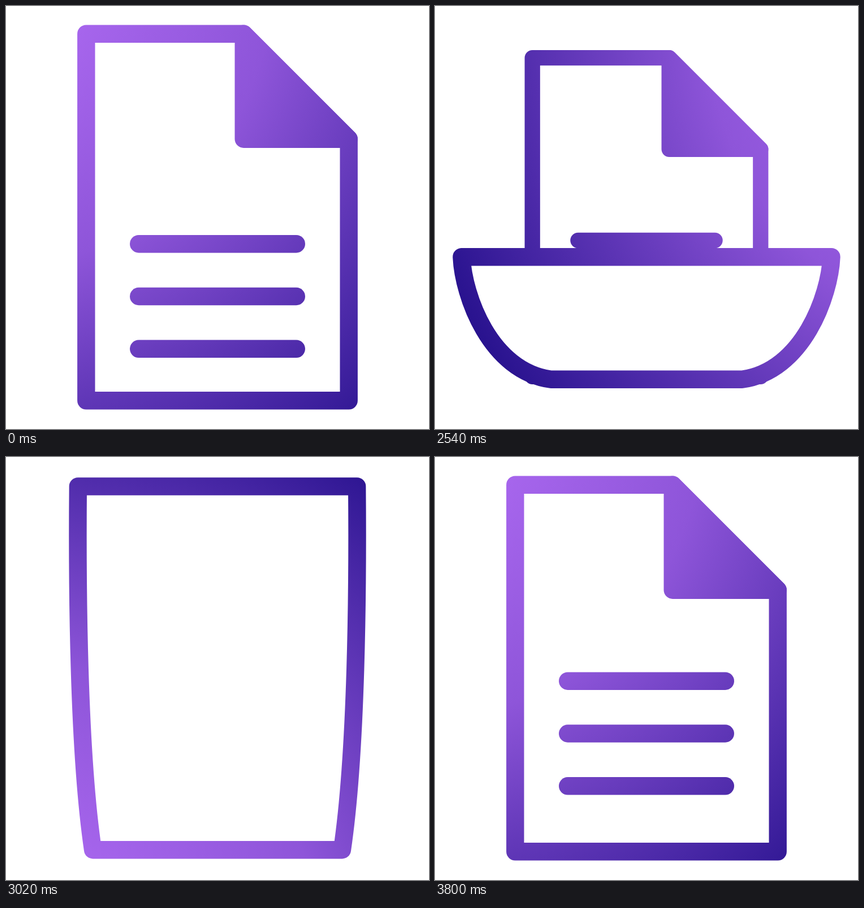
An HTML page with a canvas that plays this animation: 748 px wide and 748 px high, repeating every 3.83 s.

```html
<!DOCTYPE html>
<html lang="en">
<head>
<meta charset="utf-8">
<title>Page swap</title>
<style>
  html, body { margin: 0; width: 100%; height: 100%; overflow: hidden; background: #fff; }
  canvas { display: block; width: 100vw; height: 100vh; }
</style>
</head>
<body>
<canvas id="stage" width="748" height="748"></canvas>
<script>
const ctx = document.getElementById('stage').getContext('2d');
const LOOP = 3830, HOLD = 2030, STEP = 30;
const MID_X = 374, MID_Y = 373.4, STROKE = 31.4, FOLD = 186;
const LIFT = 24.4;

const clamp = x => Math.min(1, Math.max(0, x));
const part = (n, from, to) => clamp((n - from) / (to - from));
const smooth = x => x * x * (3 - 2 * x);
const easeOut = power => x => 1 - (1 - x) ** power;
const hump = x => Math.sin(Math.PI * x);
const linear = x => x;

// The sheet opens from a line into a bowl, a cup and a page.
// half and base are its half widths above and below; [out, along] are the side handles.
const line = { at: 9, top: 704.5, bottom: 704.5, half: 270, base: 165, upper: [0, 0], lower: [0, 0] };
const bowl = { at: 17, top: 443.7, bottom: 660.3, half: 327, base: 169, upper: [-3, 68], lower: [108, 15], ease: linear };
const cup = { at: 26, top: 133.5, bottom: 681.4, half: 290, base: 185, upper: [6, 157], lower: [103, 141], ease: linear };
const page = { at: 40, top: 49.2 - LIFT, bottom: 697.8 - LIFT, half: 232.2, base: 232.2, upper: [0, FOLD], lower: [0, FOLD], ease: easeOut(2) };
const poses = [line, bowl, cup, page];

const fullPage = {
  ...page, top: page.top + LIFT, bottom: page.bottom + LIFT,
  fold: 2, lineTop: 371.5, lines: [1, 1, 1]
};

function mix(a, b, x) {
  return Array.isArray(a) ? a.map((v, i) => mix(v, b[i], x)) : a + (b - a) * x;
}

function newSheet(n) {
  const i = Math.max(1, poses.findIndex(pose => n < pose.at));
  const next = n < page.at ? poses[i] : page;
  const last = n < page.at ? poses[i - 1] : cup;
  const x = next.ease(part(n, last.at, next.at));
  const sheet = {
    fold: 2 * smooth(part(n, 37, 57)),
    lineTop: 347,
    lines: [35, 38, 41].map(begin => easeOut(3)(part(n, begin, begin + 10)))
  };
  for (const key of ['top', 'bottom', 'half', 'base', 'upper', 'lower'])
    sheet[key] = mix(last[key], next[key], x);

  // the line grows, the cup stretches downwards, the page settles
  const grow = part(n, 0, line.at);
  const drop = 7.5 * (1 - grow) + LIFT * smooth(part(n, 43, 57));
  sheet.half *= grow;
  sheet.base *= grow;
  sheet.top += drop;
  sheet.bottom += drop + 20 * hump(part(n, cup.at, 38));
  return sheet;
}

// The light circles the stage once, swinging wider on its way
function lightPaint(n, scale) {
  const angle = 2 * Math.PI * (smooth(part(n, 0, 54) ** 0.88) - 0.375);
  const radius = (614 + 130 * hump(part(n, 5, 37)) ** 2) / scale;
  const x = radius * Math.cos(angle), y = radius * Math.sin(angle);
  const paint = ctx.createRadialGradient(x, MID_Y + y, 0, x, MID_Y + y, 1090 / scale);
  paint.addColorStop(0.2, '#a665ec');
  paint.addColorStop(0.49, '#8e55d9');
  paint.addColorStop(1, '#28128e');
  return paint;
}

// x is measured from the middle of the stage, y from its top
function drawPage(p, n, scale) {
  ctx.setTransform(scale, 0, 0, scale, MID_X, MID_Y * (1 - scale));
  const paint = ctx.strokeStyle = lightPaint(n, scale);
  ctx.lineWidth = STROKE;
  ctx.lineJoin = ctx.lineCap = 'round';

  const { top, bottom, half, base } = p;
  const [upOut, upDown] = p.upper, [lowOut, lowUp] = p.lower;
  const cut = clamp(p.fold), flap = clamp(p.fold - 1);
  const reach = clamp(cut * 3), start = FOLD * reach;
  const dip = FOLD / 2 * cut, pull = 58 * cut, bend = 105 * (1 - cut) * reach;

  ctx.beginPath();
  ctx.moveTo(-half, top);
  ctx.lineTo(half - start, top);
  ctx.bezierCurveTo(half - start + bend, top, half - dip - pull, top + dip - pull, half - dip, top + dip);
  ctx.bezierCurveTo(half - dip + pull, top + dip + pull, half, top + start - bend, half, top + start);
  ctx.bezierCurveTo(half + upOut, top + Math.max(upDown, start), base + lowOut, bottom - lowUp, base, bottom);
  ctx.lineTo(-base, bottom);
  ctx.bezierCurveTo(-base - lowOut, bottom - lowUp, -half - upOut, top + upDown, -half, top);
  ctx.closePath();
  ctx.fillStyle = '#fff';
  ctx.fill();
  ctx.stroke();

  if (flap > 0) {
    const tip = FOLD / 2 * (1 + flap);
    ctx.beginPath();
    ctx.moveTo(half - FOLD, top);
    ctx.lineTo(half, top + FOLD);
    ctx.lineTo(half - tip, top + tip);
    ctx.closePath();
    ctx.fillStyle = paint;
    ctx.fill();
    ctx.stroke();
  }

  p.lines.forEach((length, i) => {
    if (length <= 0) return;
    const y = top + p.lineTop + 92.8 * i;
    ctx.beginPath();
    ctx.moveTo(-139.3, y);
    ctx.lineTo(-139.3 + 278.6 * length, y);
    ctx.stroke();
  });
}

function draw(now) {
  const n = Math.max(0, Math.floor((now % LOOP - HOLD) / STEP));
  ctx.setTransform(1, 0, 0, 1, 0, 0);
  ctx.fillStyle = '#fff';
  ctx.fillRect(0, 0, 748, 748);
  if (n <= cup.at) drawPage(fullPage, n, 1 - 1.936e-4 * n ** 2.3);
  if (n > 0) drawPage(newSheet(n), n, 1);
}

const begin = performance.now();
function tick() {
  draw(performance.now() - begin);
  requestAnimationFrame(tick);
}
tick();
</script>
</body>
</html>
```
